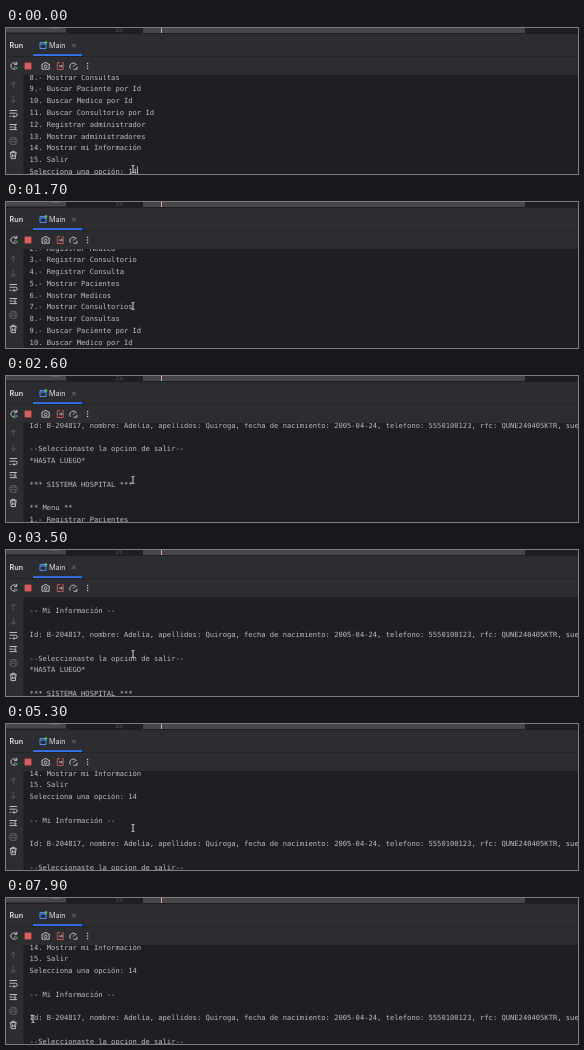
An HTML page with a canvas for the animation above (8 s loop, 572 px wide and 146 px high).

```html
<!DOCTYPE html>
<html lang="es">
<head>
<meta charset="utf-8">
<title>Run console</title>
<style>
  html, body { margin: 0; width: 100%; height: 100%; overflow: hidden; background: #1e1f22; }
  canvas { display: block; width: 572px; height: 146px; }
</style>
</head>
<body>
<canvas id="stage"></canvas>
<script>
const W = 572, H = 146, LOOP = 8000;
const ENTER = 450, PITCH = 11.78, LEFT = 23.6, CELL = 4.293;
const canvas = document.getElementById('stage');
const ctx = canvas.getContext('2d');
const ratio = window.devicePixelRatio || 1;
canvas.width = W * ratio;
canvas.height = H * ratio;

const MONO = '7.13px "DejaVu Sans Mono", "Noto Sans Mono", monospace';
const UI = 'Inter, Roboto, sans-serif';
const PANEL = '#2b2d30', DARK = '#1e1f22', TEXT = '#bcbec4', ICON = '#ced0d6', DIM = '#5a5d63';
const RED = '#db5c5c', BLUE = '#3574f0';

const menu = [
  '1.- Registrar Pacientes', '2.- Registrar Medico', '3.- Registrar Consultorio',
  '4.- Registrar Consulta', '5.- Mostrar Pacientes', '6.- Mostrar Medicos',
  '7.- Mostrar Consultorios', '8.- Mostrar Consultas', '9.- Buscar Paciente por Id',
  '10. Buscar Medico por Id', '11. Buscar Consultorio por Id', '12. Registrar administrador',
  '13. Mostrar administradores', '14. Mostrar mi Información', '15. Salir'
];
const prompt = 'Selecciona una opción: ';
const before = [...menu.slice(7), prompt + '14'];
const after = [
  ...before, '', '-- Mi Información --', '',
  'Id: B-204817, nombre: Adelia, apellidos: Quiroga, fecha de nacimiento: 2005-04-24, ' +
  'telefono: 5550100123, rfc: QUNE240405KTR, sueldo: 12000.0',
  '', '--Seleccionaste la opcion de salir--', '*HASTA LUEGO*', '',
  '*** SISTEMA HOSPITAL ***', '', '** Menu **', ...menu, prompt
];

// Each wheel notch moves three lines with a short ease-out.
const notches = [1250, 1560, 1960, 2160, 2360, 3050, 4785];
const pointer = [
  [0, 127, 141], [300, 127, 141], [900, 129, 111], [1100, 129, 111], [1400, 127, 104],
  [5500, 127, 104], [6200, 40, 125], [7350, 40, 125], [7800, 27, 121], [LOOP, 27, 121]
];

const clamp = v => Math.max(0, Math.min(1, v));
const easeOut = p => 1 - (1 - p) ** 2;
const smooth = p => p * p * (3 - 2 * p);

function topLine(t) {
  if (t < ENTER) return 0;
  return notches.reduce((top, at) => top - 3 * easeOut(clamp((t - at) / 200)), after.length - 9);
}

function pointerAt(t) {
  const i = pointer.findIndex((k, n) => n > 0 && t <= k[0]);
  const [t0, x0, y0] = pointer[i - 1], [t1, x1, y1] = pointer[i];
  const p = smooth((t - t0) / (t1 - t0));
  return [x0 + (x1 - x0) * p, y0 + (y1 - y0) * p];
}

function rect(color, x, y, w, h) {
  ctx.fillStyle = color;
  ctx.fillRect(x, y, w, h);
}

function label(text, x, y, font, color) {
  ctx.font = font;
  ctx.fillStyle = color;
  ctx.fillText(text, x, y);
}

function path(color, d, width = 0.9) {
  ctx.strokeStyle = color;
  ctx.lineWidth = width;
  ctx.stroke(new Path2D(d));
}

function dot(color, x, y, r) {
  ctx.fillStyle = color;
  ctx.beginPath();
  ctx.arc(x, y, r, 0, Math.PI * 2);
  ctx.fill();
}

function drawEditorEdge() {
  rect(DARK, 0, 0, W, 6);
  rect('#45474b', 0, 0, 60, 4.5);
  rect('#5d6065', 46, 0, 7, 1);
  label('15', 109, 4, '6.5px "DejaVu Sans Mono", monospace', '#55585e');
  rect('#45474b', 137, 0, 382, 5);
  rect('#d7a5a5', 155, 0, 1, 5);
}

function drawTabs() {
  rect(PANEL, 0, 6, W, 41);
  rect(DARK, 0, 28, W, 0.6);
  label('Run', 3.6, 20, '600 7.2px ' + UI, '#dfe1e5');
  path('#548af7', 'M34 14.5h6v6h-6z M34 16h6', 1);
  dot('#5fad65', 39.8, 14.6, 1.6);
  label('Main', 43, 20, '7.2px ' + UI, '#dfe1e5');
  path('#868a91', 'M66 15.7l3.6 3.6M69.6 15.7l-3.6 3.6', 0.7);
  rect(BLUE, 27, 26.2, 49, 1.8);
}

function drawToolbar() {
  path(ICON, 'M10.6 36A3.2 3.2 0 1 0 9 41 M10.8 33.8v2.6h-2.6');
  path('#5fad65', 'M8.6 38.3l3 1.7l-3 1.7z', 0.8);
  rect(RED, 18.6, 34.6, 6.8, 6.8);
  path(ICON, 'M36 36h1.5l.8-1.3h2.6l.8 1.3h1.5v5.2h-7.2z M41 38.4a1.4 1.4 0 1 1-2.8 0a1.4 1.4 0 1 1 2.8 0');
  path(RED, 'M54 34.7h-2.7v6.8h5.9v-6.8h-1.4');
  path(ICON, 'M52.8 38.1h3.4M55 36.8l1.3 1.3l-1.3 1.3', 0.8);
  path(ICON, 'M64.4 40.8A3.6 3.6 0 1 1 70.5 37 M67 38.6l2-2 M67.5 41.2h3.4v-2.4', 0.9);
  for (const y of [35.5, 38, 40.5]) dot(ICON, 81.6, y, 0.7);
}

function drawSidebar() {
  rect(PANEL, 0, 47, 17.5, H - 47);
  path(DIM, 'M7.3 60.5v-6.6M4.8 56.4l2.5-2.5l2.5 2.5');
  path(DIM, 'M7.3 68v6.6M4.8 72.1l2.5 2.5l2.5-2.5');
  path(ICON, 'M3.6 82.5h7.4M3.6 85.2h6a1.6 1.6 0 0 1 0 3.2h-2.4M8.3 87.1l-1.3 1.3l1.3 1.3M3.6 88.4h1.8');
  path(ICON, 'M3.6 96.5h7.4M3.6 99h3M3.6 101.6h7.4M9 97v3.4M7.7 99.2l1.3 1.3l1.3-1.3');
  path(DIM, 'M5 111.3v-1.8h4.6v1.8M5 114.8h-1.4v-3.5h7.4v3.5h-1.4M5 113.4h4.6v3h-4.6z');
  path(ICON, 'M3.8 124.7h7M5.8 124.5v-1.2h3v1.2M4.7 125l.5 5.6h4.2l.5-5.6M6.5 126.5v2.5M8.1 126.5v2.5');
}

function drawConsole(t) {
  const lines = t < ENTER ? before : after;
  const top = topLine(t);
  ctx.save();
  ctx.beginPath();
  ctx.rect(17.5, 47, W - 17.5, H - 47);
  ctx.clip();
  lines.forEach((line, i) => {
    const y = 51.6 + (i - top) * PITCH;
    if (y > 40 && y < H + 10) label(line, LEFT, y, MONO, TEXT);
  });
  const last = lines.length - 1;
  const since = t < ENTER ? t : t - ENTER;
  if (since % 1000 < 600) {
    const x = LEFT + lines[last].length * CELL;
    rect('#ced0d6', x, 44.2 + (last - top) * PITCH, 0.9, 9);
  }
  ctx.restore();
}

function drawPointer(t) {
  const [x, y] = pointerAt(t);
  ctx.save();
  ctx.translate(x, y);
  path('#e6e6e6', 'M-1.5 -3.6Q0 -3.6 0 -2.7Q0 -3.6 1.5 -3.6M0 -2.7V2.7M-1.5 3.6Q0 3.6 0 2.7Q0 3.6 1.5 3.6', 0.9);
  ctx.restore();
}

function draw(t) {
  ctx.setTransform(ratio, 0, 0, ratio, 0, 0);
  rect(DARK, 0, 0, W, H);
  drawEditorEdge();
  drawTabs();
  drawToolbar();
  drawSidebar();
  drawConsole(t);
  drawPointer(t);
}

const start = performance.now();
function tick() {
  draw((performance.now() - start) % LOOP);
  requestAnimationFrame(tick);
}
tick();
</script>
</body>
</html>
```
